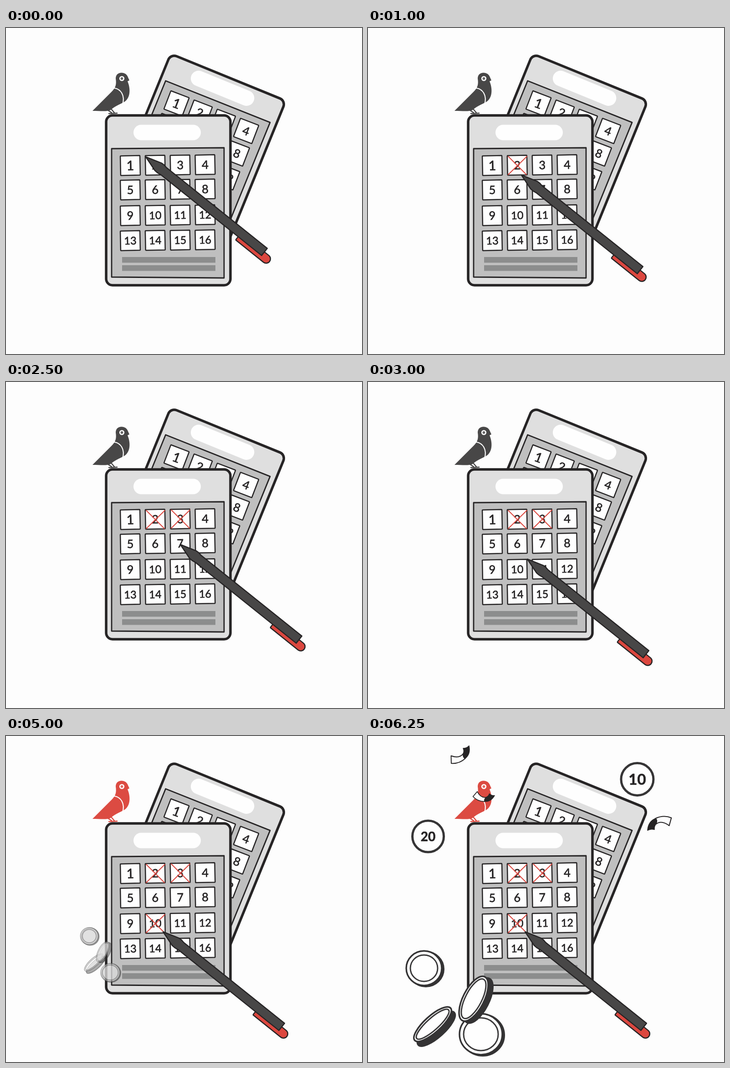
Write an HTML page with a canvas that moves like this. It is 782x716 px and loops after 8500 ms.

```html
<!DOCTYPE html>
<html lang="en">
<head>
<meta charset="utf-8">
<title>Number cards</title>
<style>
html, body { margin: 0; width: 100%; height: 100%; overflow: hidden; background: #fdfdfd; }
canvas { display: block; }
</style>
</head>
<body>
<canvas id="stage" width="782" height="716"></canvas>
<script>
const ctx = document.getElementById('stage').getContext('2d');
const INK = '#262425', DARK = '#484747', RED = '#dc473f', WHITE = '#fefefe';
const LOOP = 8500, TICK = 250;

// Pen tip per tick: two strokes on each crossed cell, with travel between.
const TIPS = [
  [307, 283], [309, 322], [350, 281], [308, 282], [337, 323],
  [350, 322], [364, 322], [404, 281], [363, 282], [393, 322],
  [383, 357], [366, 373], [350, 389],
  [309, 431], [350, 391], [308, 391], [345, 430]
];
// Crossed cells: left, top, tick of the first and of the second stroke.
const CROSSES = [[308, 282, 2, 4], [363, 281, 7, 9], [308, 392, 14, 16]];

// Poses: tick, x, y, scale, rotation in degrees, opacity.
const COINS = [
  { rx: 39, ry: 38, tilt: 0, dx: 2, dy: 1, poses: [[20, 184, 440, .5, 0, .4], [22, 169, 453, .7, 0, .9], [25, 125, 511, 1, 0, 1]] },
  { rx: 53, ry: 18, tilt: -42, dx: 4, dy: 5, poses: [[20, 195, 500, .5, 0, .4], [22, 147, 575, .8, 0, .9], [25, 146, 638, 1, 0, 1]] },
  { rx: 47, ry: 45, tilt: 0, dx: 2, dy: 1, poses: [[20, 230, 520, .45, 0, .4], [22, 255, 609, .75, 0, .9], [25, 250, 656, 1, 0, 1]] },
  { rx: 54, ry: 23, tilt: -63, dx: 5, dy: 2, poses: [[20, 215, 475, .45, 0, .4], [22, 223, 531, .73, 0, .8], [25, 237, 579, 1, 0, 1]] }
];
const RIBBONS = [
  [[21, 292, 62, .85, 14, .5], [22, 268, 46, 1, 0, 1], [25, 203, 42, .9, -42, 1]],
  [[21, 318, 152, .55, 6, .5], [22, 300, 145, .68, 4, .9], [25, 254, 133, .78, 0, 1]],
  [[21, 550, 212, .55, 120, .4], [22, 573, 206, .75, 128, .75], [25, 640, 192, .97, 155, 1]]
];

const lerp = (a, b, p) => a + (b - a) * p;

function poseAt(poses, tick) {
  if (tick < poses[0][0]) return null;
  const i = Math.max(1, poses.findIndex(p => p[0] >= tick));
  const [a, b] = [poses[i - 1], poses[i]];
  const p = (tick - a[0]) / (b[0] - a[0]);
  return a.map((v, n) => lerp(v, b[n], p));
}

function placed(x, y, degrees, scale, draw) {
  ctx.save();
  ctx.translate(x, y);
  ctx.rotate(degrees * Math.PI / 180);
  ctx.scale(scale, scale);
  draw();
  ctx.restore();
}

function paint(path, fill, stroke, width = 2.5) {
  if (fill) { ctx.fillStyle = fill; ctx.fill(path); }
  if (stroke) { ctx.strokeStyle = stroke; ctx.lineWidth = width; ctx.stroke(path); }
}
const shape = (d, ...style) => paint(new Path2D(d), ...style);

function box(x, y, w, h, r, ...style) {
  const path = new Path2D();
  path.roundRect(x, y, w, h, r);
  paint(path, ...style);
}

function oval(x, y, rx, ry, tilt, ...style) {
  const path = new Path2D();
  path.ellipse(x, y, rx, ry, tilt * Math.PI / 180, 0, 2 * Math.PI);
  paint(path, ...style);
}

function label(text, x, y, size, weight = 400) {
  ctx.font = `${weight} ${size}px Lato, sans-serif`;
  ctx.textAlign = 'center';
  ctx.fillStyle = ctx.strokeStyle = INK;
  ctx.lineWidth = .7;
  ctx.fillText(text, x, y + size * .36);
  ctx.strokeText(text, x, y + size * .36);
}

// Local origin is the top left corner of the number panel.
function card(header, pillY) {
  box(-12, -header, 273, header + 301, 14, '#dfdfdf', INK, 5.5);
  box(48, pillY - 17, 148, 34, 17, WHITE);
  shape('M0 1 L247 -1 L247 285 L0 283Z', '#bfbfbf', INK, 2.8);
  for (let i = 0; i < 16; i++) {
    const col = i % 4, row = i >> 2;
    placed(41 + col * 54.8, [38, 91.5, 148, 203][row] - col * .6, -1.2, 1, () => {
      box(-21.5, -21.5, 43, 43, 1, WHITE, INK, 2.5);
      label(i + 1, 0, 0, i === 0 ? 29 : i < 9 ? 25.5 : 23.5);
    });
  }
  box(23, 239, 205, 12.5, 0, '#8c8d8d');
  box(23, 257, 205, 12.5, 0, '#8c8d8d');
}

function bird(color) {
  shape('M241 111 C241 95 262 95 267 106 L271 115 L267 117 C273 131 274 150 263 160 ' +
    'C254 167 242 169 230 180 C222 184 208 182 190 182 L232 140 C241 131 243 124 241 111Z', color);
  shape('M238 132 C252 134 262 148 256 168', null, WHITE, 2.2);
  shape('M223 180 L232 186 M232 179 L238 186 M226 188 L244 187', null, color, 2.5);
  oval(254.5, 111, 5.6, 5.6, 0, WHITE);
  oval(254.5, 111, 2.7, 2.7, 0, color);
  oval(254.5, 111, .8, .8, 0, WHITE);
}

function crosses(tick) {
  for (const [x, y, first, second] of CROSSES) {
    if (tick >= first) shape(`M${x} ${y + 40} l41 -40`, null, RED, 2);
    if (tick >= second) shape(`M${x} ${y} l40 40`, null, RED, 2);
  }
}

function pen(tick) {
  const [x, y] = TIPS[Math.min(tick, TIPS.length - 1)];
  placed(x, y, 38.7, 1, () => {
    box(268, 0, 88, 19, [0, 10, 10, 2], RED, INK, 2.5);
    shape('M0 0 L36 -11 Q43 -12 50 -10 L334 -10 L334 10 L50 10 Q42 12 35 11Z', DARK, INK, 2.5);
  });
}

function coin({ rx, ry, tilt, dx, dy, poses }, tick) {
  const pose = poseAt(poses, tick);
  if (!pose) return;
  const [, x, y, scale, turn, alpha] = pose;
  ctx.globalAlpha = alpha;
  placed(x, y, turn, scale, () => {
    oval(dx, dy, rx, ry, tilt, '#343334', '#343334', 4);
    oval(-dx, -dy, rx, ry, tilt, WHITE, '#343334', 3.5);
    const flat = ry < 30;
    oval(-dx, -dy, rx - (flat ? 6 : 9), ry - (flat ? 5 : 9), tilt, WHITE, '#3b3a3b', 3);
  });
  ctx.globalAlpha = 1;
}

function ribbon(poses, tick) {
  const pose = poseAt(poses, tick);
  if (!pose) return;
  const [, x, y, scale, turn, alpha] = pose;
  ctx.globalAlpha = alpha;
  placed(x, y, turn, scale, () => {
    shape('M-30 0 L-18 -14 Q-8 5 7 2 L3 14 Q-17 14 -30 0Z', WHITE, INK, 2.2);
    shape('M3 14 Q0 8 7 2 Q14 -1 16 -8 Q23 -2 31 -3 Q21 15 3 14Z', INK, INK, 1.5);
  });
  ctx.globalAlpha = 1;
}

function badge(text, x, y, r, size, tick) {
  if (tick < 21) return;
  ctx.globalAlpha = tick === 21 ? .5 : 1;
  oval(x, y, r, r, 0, WHITE, '#363536', 5);
  label(text, x, y, size, 700);
  ctx.globalAlpha = 1;
}

function birdColor(tick) {
  const p = Math.min(1, Math.max(0, (tick - 16) / 4));
  return `rgb(${lerp(72, 220, p)}, ${lerp(71, 75, p)}, ${lerp(71, 66, p)})`;
}

function frame(now) {
  const tick = Math.min(25, Math.floor(now % LOOP / TICK));
  ctx.fillStyle = '#fdfdfd';
  ctx.fillRect(0, 0, 782, 716);
  ctx.lineJoin = 'round';
  ctx.lineCap = 'round';
  placed(351, 115, 22.2, 1, () => card(58, -31));
  placed(232, 264, 0, 1, () => card(72, -34.5));
  bird(birdColor(tick));
  crosses(tick);
  pen(tick);
  badge('10', 591.5, 95, 35.5, 33, tick);
  badge('20', 132, 220.5, 34.5, 28, tick);
  COINS.forEach(c => coin(c, tick));
  RIBBONS.forEach(r => ribbon(r, tick));
}

const start = performance.now();
function play() {
  frame(performance.now() - start);
  requestAnimationFrame(play);
}
play();
</script>
</body>
</html>
```
